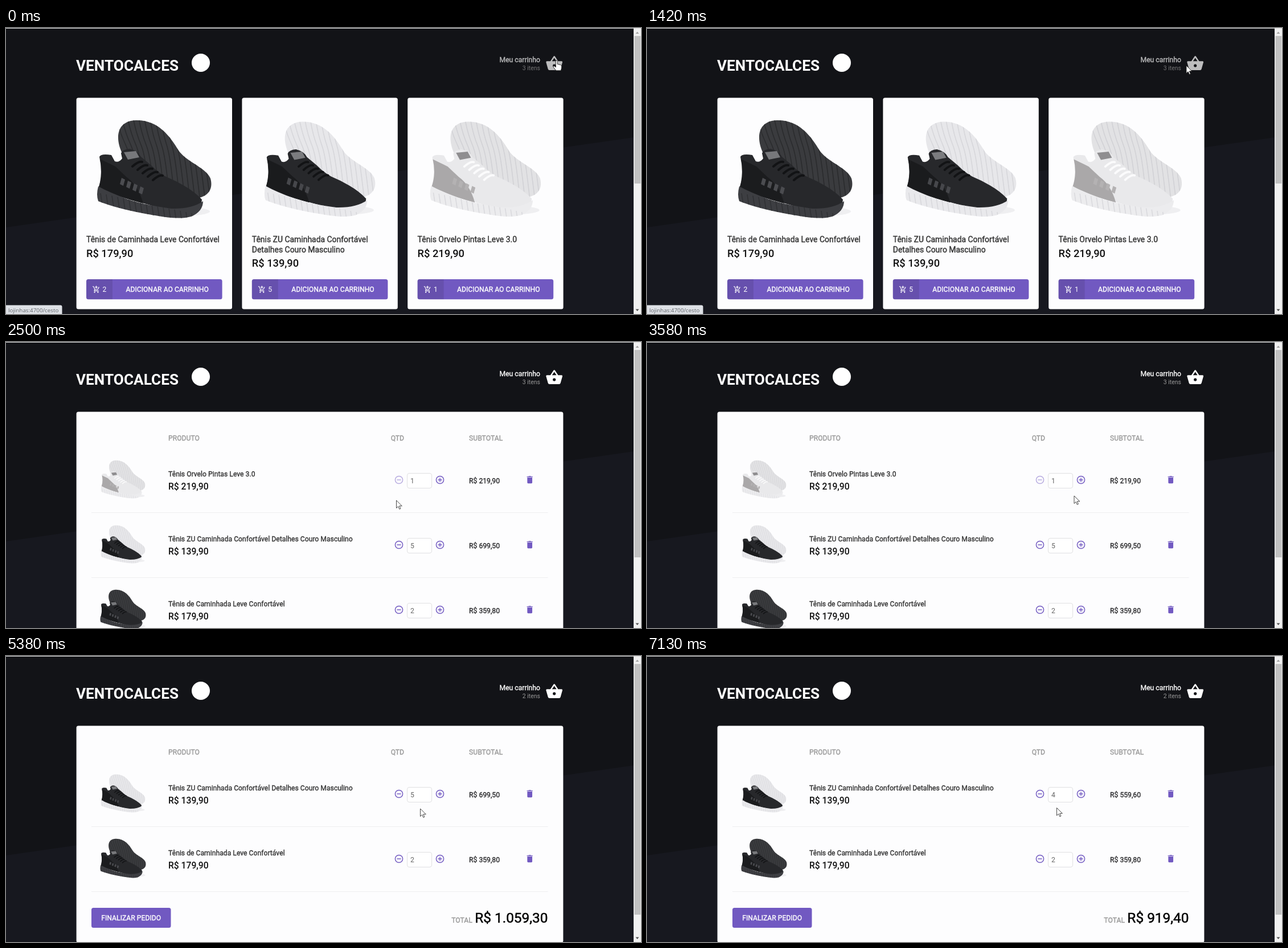
An HTML page for the animation above (7370 ms loop, 1115 px wide and 502 px high).

```html
<!DOCTYPE html>
<html lang="pt">
<head>
<meta charset="utf-8">
<title>Loja de tênis</title>
<style>
html, body { margin: 0; width: 100%; height: 100%; overflow: hidden; background: #121317; }
svg { display: block; width: 100vw; height: 100vh; font-family: Roboto, Arial, sans-serif; }
</style>
</head>
<body>
<svg id="stage" viewBox="0 0 1115 502" preserveAspectRatio="none"></svg>
<script>
const LOOP = 7370;
const PURPLE = '#7159c1', PAPER = '#fdfdfe', INK = '#2b2b2d', GREY = '#999';

const ICON = {
  basket: 'M17.2 9 12.8 2.4Q12 1.6 11.2 2.4L6.8 9H2Q1 9 1 10.3L3.6 19.5Q4 21 5.5 21h13Q20 21 20.4 19.5L23 10.3Q23 9 22 9ZM9 9l3-4.4L15 9ZM12 17a2 2 0 1 1 0-4 2 2 0 0 1 0 4Z',
  add: 'M11 9h2V6h3V4h-3V1h-2v3H8v2h3ZM7 18a2 2 0 1 0 0 4 2 2 0 0 0 0-4ZM17 18a2 2 0 1 0 0 4 2 2 0 0 0 0-4ZM7.2 14.7 8.1 13h7.4Q16.7 13 17.3 12L21.2 5 19.4 4 15.5 11h-7L4.3 2H1v2h2l3.6 7.6-1.4 2.4Q4.4 17 7 17h12v-2H7.4Z',
  trash: 'M6 19q0 2 2 2h8q2 0 2-2V7H6ZM19 4h-3.5l-1-1h-5l-1 1H5v2h14Z'
};

const tag = (name, attrs, inner = '') =>
  `<${name} ${Object.entries(attrs).map(([k, v]) => `${k}="${v}"`).join(' ')}>${inner}</${name}>`;
const rect = (x, y, width, height, fill, rx = 0, more = {}) =>
  tag('rect', { x, y, width, height, fill, rx, ...more });
const path = (d, fill, more = {}) => tag('path', { d, fill, ...more });
const text = (s, x, y, size, fill, more = {}) =>
  tag('text', { x, y, 'font-size': size, fill, ...more }, s);
const bold = (s, x, y, size, fill, more = {}) =>
  text(s, x, y, size, fill, { stroke: fill, 'stroke-width': size * 0.028, ...more });
const price = (s, x, y, size) => text('R$ ' + s, x, y, size, '#111', { 'font-weight': 500 });
const icon = (name, x, y, size, fill) =>
  path(ICON[name], fill, { transform: `translate(${x} ${y}) scale(${size / 24})` });
const END = { 'text-anchor': 'end' }, MID = { 'text-anchor': 'middle' };

// Shoes are drawn in the coordinates of the first card
const BACK = 'M206 224C190 194 194 163 228 162C264 161 286 186 303 215C318 236 350 244 359 264C365 285 352 298 332 299L260 264Z';
const UPPER = 'M164 226Q167 220 185 223L191 234Q198 237 204 229L202 220Q204 213 217 212Q231 215 237 226L255 241Q266 253 281 261Q298 268 313 277Q332 288 344 301L342 316Q310 324 285 320L161 285Q171 258 164 226Z';
const SOLE = 'M162 278Q158 293 162 304Q200 319 262 329Q304 337 325 331Q346 322 346 304Q326 318 290 317Q245 311 215 301Q182 289 162 278Z';
const HEEL = 'M165 230Q182 238 192 243L212 262Q232 276 241 308Q200 298 163 279Q171 256 165 230Z';

const SHOES = {
  dark: { back: '#3a3b3e', groove: '#2a2b2d', upper: '#27282b', heel: '#1b1c1e', sole: '#3d3e42', ridge: '#2f3033', lace: '#121315', strap: '#4b4c50', tab: '#77787b' },
  mixed: { back: '#e7e7ea', groove: '#d6d6da', upper: '#27282b', heel: '#1a1b1d', sole: '#e9e9ec', ridge: '#d7d7db', lace: '#121315', strap: '#46474b', tab: '#7b7c7f' },
  light: { back: '#e2e2e4', groove: '#d1d1d5', upper: '#e9e9eb', heel: '#aaa8a9', sole: '#ececee', ridge: '#d8d8dc', lace: '#fbfbfc', strap: '#b4b2b3', tab: '#8f8e90' }
};

function drawShoe(kind) {
  const c = SHOES[kind];
  let grooves = '', ridges = '', laces = '', straps = '';
  for (let i = 0; i < 19; i++) {
    const x = 192 + i * 10;
    grooves += `M${x} 150q${6 - i / 2} 30 ${18 - i} 55t14 100`;
    ridges += `M${166 + i * 10} ${290 + i * 2.2}l3 20`;
  }
  for (let i = 0; i < 5; i++) laces += `M${222 + i * 9} ${243 + i * 6}q11-10 17-8`;
  for (let i = 0; i < 4; i++) straps += `M${203 + i * 11} ${263 + i * 5}l-3 11 6 3 3-11Z`;
  const line = (d, stroke, w, more) => path(d, 'none', { stroke, 'stroke-width': w, ...more });
  const size = kind === 'dark' ? 1 : 0.97;
  return tag('g', { transform: `translate(261 249) scale(${size}) translate(-261 -249)` },
    tag('ellipse', { cx: 306, cy: 322, rx: 52, ry: 8, fill: '#efeff1' }) +
    path(BACK, c.back) + line(grooves, c.groove, 1.6, { 'clip-path': 'url(#backClip)' }) +
    path(UPPER, c.upper) + path(HEEL, c.heel) +
    path('M207 218l21-2 6 11-20 4Z', c.tab) + path(straps, c.strap) +
    line(laces, c.lace, 4, { 'stroke-linecap': 'round' }) +
    path(SOLE, c.sole) + line(ridges, c.ridge, 1.5, { 'clip-path': 'url(#soleClip)' }));
}

const PRODUCTS = {
  light: { lines: ['Tênis Orvelo Pintas Leve 3.0'], price: '219,90' },
  mixed: { lines: ['Tênis ZU Caminhada Confortável', 'Detalhes Couro Masculino'], price: '139,90' },
  dark: { lines: ['Tênis de Caminhada Leve Confortável'], price: '179,90' }
};

function card(kind, column, count) {
  const p = PRODUCTS[kind], extra = (p.lines.length - 1) * 17.5;
  return tag('g', { transform: `translate(${column * 290.8} 0)` },
    rect(123.6, 122.6, 273.4, 371, PAPER, 3.5) + drawShoe(kind) +
    p.lines.map((s, i) => bold(s, 141, 376 + i * 17.5, 13.95, '#333')).join('') +
    price(p.price, 141, 401.7 + extra, 18.3) +
    rect(141, 441, 238.6, 35.2, PURPLE, 3.5) +
    path('M144.5 441H187V476.2H144.5Q141 476.2 141 472.7V444.5Q141 441 144.5 441Z', '#000', { opacity: 0.1 }) +
    icon('add', 151.5, 452, 14, '#fff') + text(count, 169.5, 463.2, 12.2, '#fff') +
    bold('ADICIONAR AO CARRINHO', 283.2, 463.2, 12.2, '#fff', MID));
}

function circleButton(x, plus, off) {
  const bars = `M${x - 3.6} 242h7.2` + (plus ? `M${x} 238.4v7.2` : '');
  return tag('g', { fill: 'none', stroke: PURPLE, 'stroke-width': 1.45, opacity: off ? 0.5 : 1 },
    tag('circle', { cx: x, cy: 242, r: 6.6 }) + `<path d="${bars}"/>`);
}

function row(kind, index, qty, subtotal, ids = false) {
  const p = PRODUCTS[kind], id = name => ids ? { id: name } : {};
  return tag('g', { transform: `translate(0 ${index * 114})` },
    tag('g', { transform: 'translate(162 198) scale(.4) translate(-151.5 -140)' }, drawShoe(kind)) +
    bold(p.lines.join(' '), 285, 236.2, 12.2, '#333') +
    price(p.price, 285, 259, 15.7) +
    circleButton(690, false, qty === 1) + circleButton(762, true) +
    rect(704.5, 230.5, 43, 26, '#fff', 3.5, { stroke: '#e0e0e2' }) +
    text(qty, 710, 248, 12.2, '#666', id('qty')) +
    bold('R$ ' + subtotal, 813, 247.7, 12.2, INK, id('subtotal')) +
    icon('trash', 911, 233, 17.4, PURPLE) +
    rect(150, 299, 801.5, 1, '#eeeef0'));
}

const cartTop = height => rect(123.6, 122.6, 854.8, height, PAPER, 3.5) +
  bold('PRODUTO', 285, 173, 12.2, GREY) + bold('QTD', 675.7, 173, 12.2, GREY) +
  bold('SUBTOTAL', 813, 173, 12.2, GREY);

const home = card('dark', 0, 2) + card('mixed', 1, 5) + card('light', 2, 1);
const cartFull = cartTop(495) + row('light', 0, 1, '219,90') + row('mixed', 1, 5, '699,50') + row('dark', 2, 2, '359,80');
const cartLess = cartTop(380.5) + row('mixed', 0, 5, '699,50', true) + row('dark', 1, 2, '359,80') +
  rect(150, 442, 139.5, 35, PURPLE, 3.5) + bold('FINALIZAR PEDIDO', 219.7, 464, 12.2, '#fff', MID) +
  tag('text', { x: 951.5, y: 468, ...END },
    tag('tspan', { 'font-size': 12.2, fill: GREY, stroke: GREY, 'stroke-width': 0.35 }, 'TOTAL') +
    tag('tspan', { id: 'total', dx: 4.4, 'font-size': 24.4, fill: '#000', stroke: '#000', 'stroke-width': 0.5 }, ''));

const stage = document.getElementById('stage');
stage.innerHTML =
  `<defs><clipPath id="backClip"><path d="${BACK}"/></clipPath><clipPath id="soleClip"><path d="${SOLE}"/></clipPath></defs>` +
  rect(0, 0, 1115, 502, '#121317') +
  path('M0 350L1102 192V502H0Z', '#17181f') +
  text('VENTOCALCES', 123, 75, 26.2, '#fff', { 'font-weight': 700 }) +
  tag('circle', { cx: 342, cy: 61, r: 16, fill: '#fff' }) +
  tag('g', { id: 'basket' },
    bold('Meu carrinho', 938, 59.8, 12.2, '#fff', END) +
    text('', 938, 74, 10.46, GREY, { id: 'items', ...END }) +
    icon('basket', 947, 46.4, 31.4, '#fff')) +
  tag('g', { id: 'home' }, home) + tag('g', { id: 'cartFull' }, cartFull) + tag('g', { id: 'cartLess' }, cartLess) +
  rect(0, 0, 1115, 1, '#dedede') +
  rect(1102, 1, 13, 501, '#f1f1f1') + rect(1103.4, 14, 10.8, 259, '#c1c1c1', 0, { id: 'thumb' }) +
  path('M1105.5 10l3-3.5 3 3.5Z', '#a3a3a3') + path('M1105.5 493.5l3 3.5 3-3.5Z', '#505050') +
  tag('g', { id: 'status' },
    rect(-4, 486.5, 102, 20, '#dee1e6', 3, { id: 'bubble' }) +
    text('lojinhas:4700/cesto', 4, 498.5, 9.8, '#5f6368', { 'font-family': "'Open Sans', 'Noto Sans', sans-serif" })) +
  tag('g', { id: 'cursor', fill: '#fff', stroke: '#1a1a1a', 'stroke-width': 0.8, 'stroke-linejoin': 'round' },
    '<path id="arrow" d="M0 0V13.5L3.2 10.6 5.3 15.4 7.4 14.5 5.3 9.8H9.8Z"/>' +
    '<path id="hand" transform="scale(1.08)" d="M-1.5 1.2C-1.5-.5 1.2-.5 1.2 1.2V6L6 7Q8 7.6 8 9.5V12L6.8 16.5H-1L-5.2 11C-6.2 9.4-4.6 8.4-3.4 9.4L-1.5 11Z"/>');

const el = {};
stage.querySelectorAll('[id]').forEach(n => el[n.id] = n);

// time, x, y of the pointer tip
const MOVES = [
  [0, 967, 57], [170, 967, 57], [880, 961, 60], [1380, 947, 66], [1540, 947, 66], [1660, 949, 65],
  [2240, 949, 65], [2380, 934, 73], [2460, 745, 235], [2500, 685.5, 278], [2760, 685, 279],
  [3130, 700, 277], [3560, 750, 270], [3640, 750, 270], [3920, 766, 284], [4300, 850, 278],
  [4670, 918, 237], [5020, 918, 237], [5340, 727.5, 268], [5500, 727.5, 268], [5840, 690, 240],
  [6290, 690, 240], [6700, 712, 262], [7000, 719, 266.5], [7080, 719.5, 266.5], [LOOP, 719.5, 266.5]
];
const HANDS = [[0, 1380], [1560, 2300], [4600, 5080], [5780, 6420]];
const SWAP = 1560, REMOVE = 4920, LESS = 6060;

function pointer(t) {
  const i = Math.max(1, MOVES.findIndex(m => m[0] > t));
  const [t0, x0, y0] = MOVES[i - 1], [t1, x1, y1] = MOVES[i];
  const k = (t - t0) / (t1 - t0);
  return [x0 + (x1 - x0) * k, y0 + (y1 - y0) * k];
}
const show = (node, on) => node.setAttribute('display', on ? 'inline' : 'none');
const put = (node, s) => { if (node.textContent !== s) node.textContent = s; };

function draw(t) {
  const page = t < SWAP ? 'home' : t < REMOVE ? 'cartFull' : 'cartLess';
  for (const name of ['home', 'cartFull', 'cartLess']) show(el[name], name === page);
  el.thumb.setAttribute('height', { home: 259, cartFull: 364, cartLess: 440 }[page]);
  put(el.items, t < REMOVE ? '3 itens' : '2 itens');

  const fewer = t >= LESS;
  put(el.qty, fewer ? '4' : '5');
  put(el.subtotal, fewer ? 'R$ 559,60' : 'R$ 699,50');
  put(el.total, fewer ? 'R$ 919,40' : 'R$ 1.059,30');

  const fade = Math.min(1, Math.max(0, (t - 2200) / 180));
  el.basket.setAttribute('opacity', 0.72 + 0.28 * fade);
  show(el.status, t < 2460);
  el.bubble.setAttribute('width', t < 1710 ? 102.5 : 374.5);

  const [x, y] = pointer(t), hand = HANDS.some(([a, b]) => t >= a && t < b);
  el.cursor.setAttribute('transform', `translate(${x} ${y})`);
  show(el.hand, hand);
  show(el.arrow, !hand);
}

const start = performance.now();
function tick() {
  draw((performance.now() - start) % LOOP);
  requestAnimationFrame(tick);
}
tick();
</script>
</body>
</html>
```
